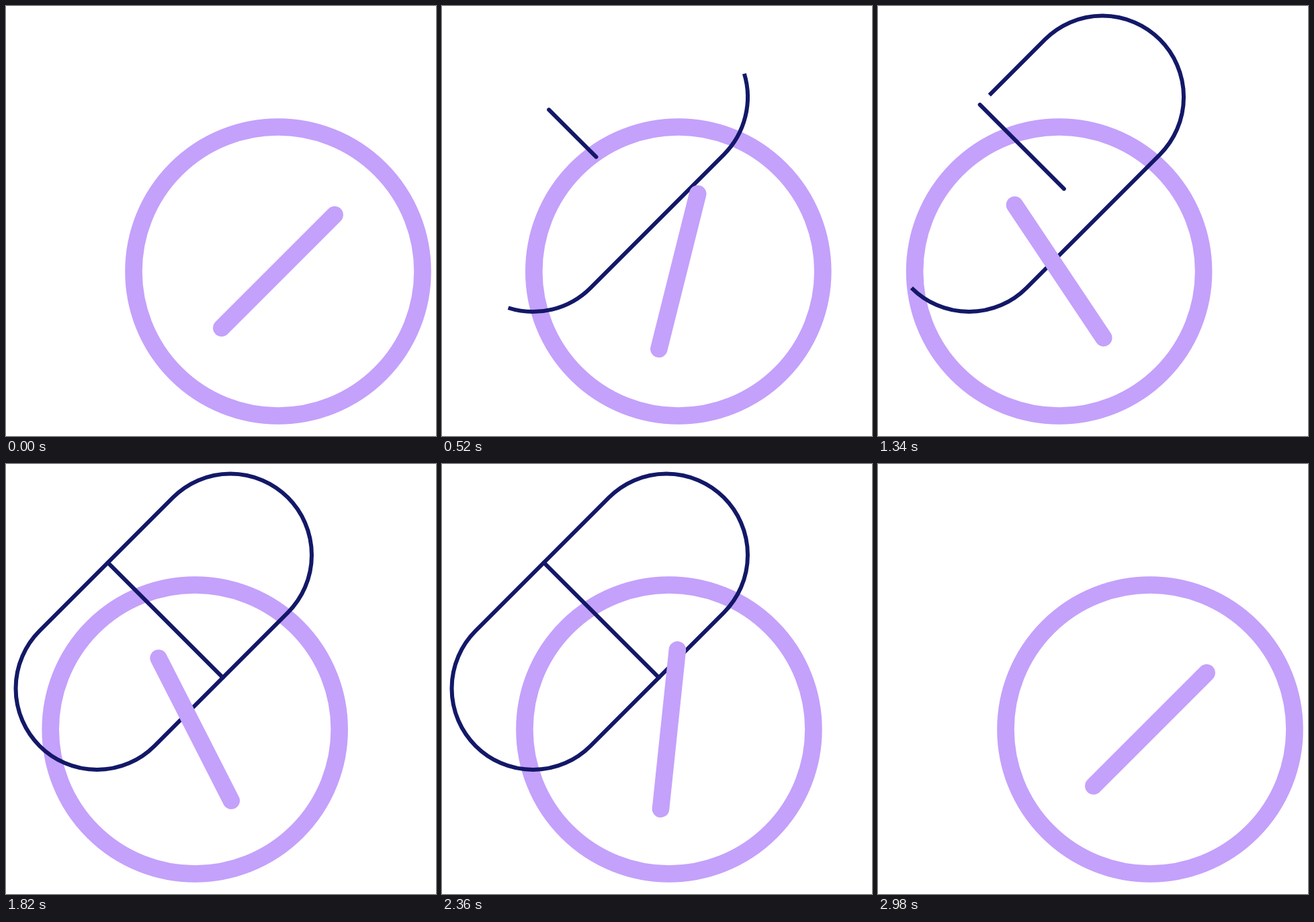
Animation, 640 px wide and 640 px high, one loop 3000 ms. Source, as an HTML page with a canvas:

```html
<!DOCTYPE html>
<html lang="en">
<head>
<meta charset="utf-8">
<title>Pills</title>
<style>
html, body { margin: 0; width: 100%; height: 100%; overflow: hidden; background: #fff; }
canvas { display: block; width: 100%; height: 100%; }
</style>
</head>
<body>
<canvas id="stage" width="640" height="640"></canvas>
<script>
const ctx = document.getElementById('stage').getContext('2d');
const LOOP = 3000, TICK = 20, STEP = 24, LAST = 124, TURN = 64;
const PURPLE = '#c4a1fb', NAVY = '#131868';
const R = 121, LO = 135.5, HI = 334, Q = Math.PI / 4;
const CAPSULE_LEN = 2 * Math.PI * R + 2 * Math.SQRT2 * (HI - LO);
const DIVIDER = [151.7, 146.9, 322.7, 317.9];

const ramp = (k, a, b) => Math.min(1, Math.max(0, (k - a) / (b - a)));

function stroke(path, color, width, cap) {
  ctx.strokeStyle = color;
  ctx.lineWidth = width;
  ctx.lineCap = cap;
  ctx.stroke(path);
}

function line(x1, y1, x2, y2) {
  const p = new Path2D();
  p.moveTo(x1, y1);
  p.lineTo(x2, y2);
  return p;
}

// The outline starts at the lower left and runs counterclockwise.
const capsule = new Path2D();
capsule.arc(LO, HI, R, 3 * Q, Q, true);
capsule.arc(HI, LO, R, Q, -3 * Q, true);
capsule.arc(LO, HI, R, 5 * Q, 3 * Q, true);
capsule.closePath();

function tablet(k) {
  const p = k < TURN ? k / TURN : (LAST - k) / (LAST - TURN);
  const x = 405 - 154.75 * p, y = 395;
  const a = Q * (1 - 2 * p);
  const dx = 119 * Math.sin(a), dy = 119 * Math.cos(a);
  const ring = new Path2D();
  ring.arc(x, y, 215, 0, 2 * Math.PI);
  return { ring, bar: line(x - dx, y + dy, x + dx, y - dy) };
}

// Visible part of the capsule lines, as fractions of their length.
function trim(k) {
  if (k < 36) return [1 - ramp(k, 0, 23), 1 - ramp(k, 10, 32)];
  return [0, ramp(k, 39.9, 61.9) - ramp(k, 100, 122)];
}

function drawCapsule(from, to) {
  if (to - from < 1e-4) return;
  const whole = to - from > 0.9999;
  const len = CAPSULE_LEN;
  if (!whole) {
    ctx.setLineDash([(to - from) * len, 2 * len]);
    ctx.lineDashOffset = -from * len;
  }
  stroke(capsule, NAVY, 6, 'butt');
  ctx.setLineDash([]);
  const [x1, y1, x2, y2] = DIVIDER;
  const at = f => [x1 + (x2 - x1) * f, y1 + (y2 - y1) * f];
  stroke(line(...at(from), ...at(to)), NAVY, 6, 'round');
}

function draw(now) {
  const t = Math.floor((now % LOOP) / TICK) * TICK;
  const k = Math.min(LAST, Math.max(0, Math.ceil(t / STEP - 0.5)));
  const { ring, bar } = tablet(k);
  ctx.fillStyle = '#fff';
  ctx.fillRect(0, 0, 640, 640);
  stroke(ring, PURPLE, 25.6, 'butt');
  drawCapsule(...trim(k));
  stroke(bar, PURPLE, 25.6, 'round');
}

function loop() {
  draw(performance.now());
  requestAnimationFrame(loop);
}
loop();
</script>
</body>
</html>
```
